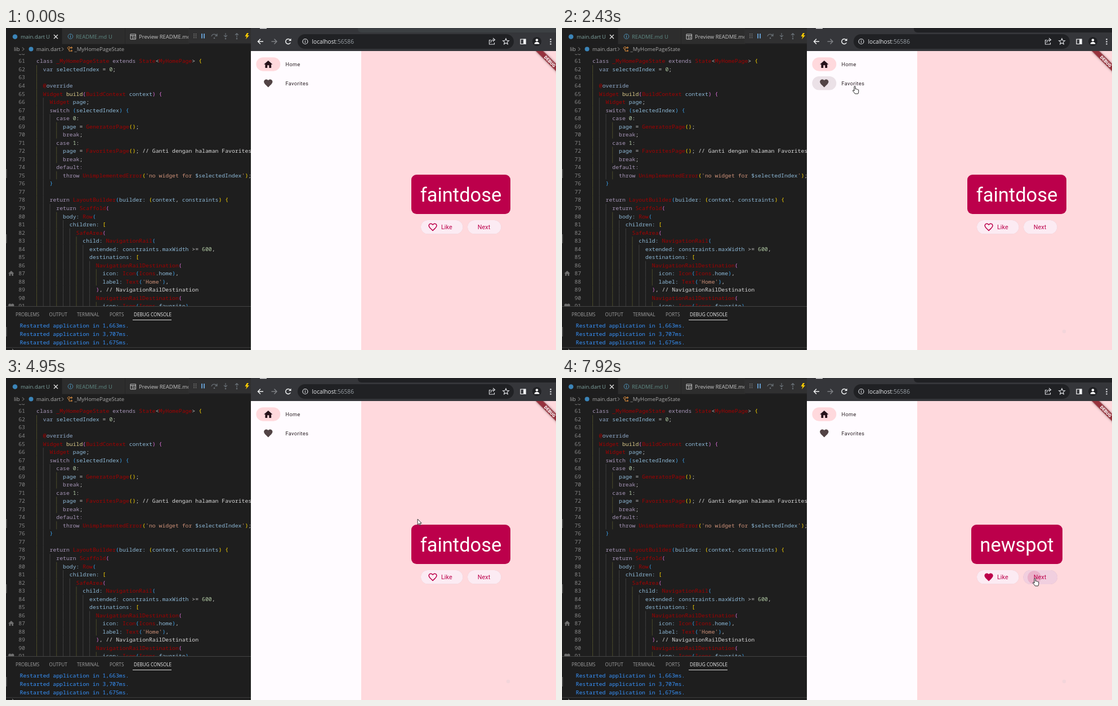
Recreate the animation shown at these times as an HTML page. Size 977 by 573 pixels, loop 7990 ms.

```html
<!DOCTYPE html>
<html lang="en">
<head>
<meta charset="utf-8">
<title>Word pair app</title>
<style>
  html, body { margin: 0; width: 100%; height: 100%; overflow: hidden; background: #1e1e1e; }
  svg { display: block; }
  text { white-space: pre; }
  .code { font: 9.8px "Noto Sans Mono", "DejaVu Sans Mono", monospace; }
  .ui { font: 9.5px "Open Sans", "Noto Sans", sans-serif; fill: #c4c4c4; }
  .panel { font-size: 8.2px; fill: #a0a0a0; }
  .crumb { fill: #a9a9a9; }
  .inactive { fill: #5f8a84; }
  .url { font: 10.2px "Open Sans", "Noto Sans", sans-serif; fill: #e8eaed; }
  .app { font-family: Roboto, sans-serif; }
  .label { font-size: 9.19px; letter-spacing: .38px; fill: #2a2024; }
  .body { font-size: 10.72px; letter-spacing: .08px; fill: #bc004b; }
  .line { fill: none; stroke: #dadce0; stroke-width: 1.2; }
  .bright { stroke: #f1f3f4; stroke-width: 1.5; }
  .btn { filter: drop-shadow(0 .8px .6px rgba(80, 10, 40, .2)); }
  .banner { filter: drop-shadow(0 0 2px rgba(0, 0, 0, .4)); }
</style>
</head>
<body>
<svg id="stage" width="977" height="573" viewBox="0 0 977 573">
  <defs>
    <path id="home" d="M10 20v-6h4v6h5v-8h3L12 3 2 12h3v8z"/>
    <path id="heart" d="M12 21.35l-1.45-1.32C5.4 15.36 2 12.28 2 8.5 2 5.42 4.42 3 7.5 3c1.74 0 3.41.81 4.5 2.09C13.09 3.81 14.76 3 16.5 3 19.58 3 22 5.42 22 8.5c0 3.78-3.4 6.86-8.55 11.54z"/>
    <path id="hollow" fill-rule="evenodd" d="M16.5 3c-1.74 0-3.41.81-4.5 2.09C10.91 3.81 9.24 3 7.5 3 4.42 3 2 5.42 2 8.5c0 3.78 3.4 6.86 8.55 11.54L12 21.35l1.45-1.32C18.6 15.36 22 12.28 22 8.5 22 5.42 19.58 3 16.5 3zm-4.4 15.55l-.1.1-.1-.1C7.14 14.24 4 11.39 4 8.5 4 6.5 5.5 5 7.5 5c1.54 0 3.04.99 3.57 2.36h1.87C13.46 5.99 14.96 5 16.5 5c2 0 3.5 1.5 3.5 3.5 0 2.89-3.14 5.74-7.9 10.05z"/>
    <clipPath id="editorClip"><rect y="46" width="435" height="449"/></clipPath>
    <clipPath id="likeClip"><rect x="737" y="342" width="74.5" height="24.5" rx="12.25"/></clipPath>
    <clipPath id="nextClip"><rect x="820" y="342" width="59.5" height="24.5" rx="12.25"/></clipPath>
  </defs>

  <!-- Editor -->
  <rect width="435" height="573" fill="#1e1e1e"/>
  <g id="code" class="code" clip-path="url(#editorClip)"></g>
  <g fill="#6f6f6f" clip-path="url(#editorClip)">
    <use href="#home" transform="translate(3 430.5) scale(.52)"/>
    <use href="#heart" transform="translate(3 489) scale(.52)"/>
    <path d="M0 251h1.5v16H0zM0 367h1.5v16H0z" fill="#555"/>
  </g>
  <path d="M0 532h1.5v17H0z" fill="#555"/>

  <rect width="435" height="28.5" fill="#252526"/>
  <rect width="99" height="28.5" fill="#1e1e1e"/>
  <path d="M100 0h111v28.5H100zM212 0h114v28.5H212z" fill="#2d2d2d"/>
  <g class="ui">
    <circle cx="16" cy="15.5" r="4.3" fill="#3b84b8"/>
    <text x="26" y="19" fill="#7fa3a0">main.dart</text>
    <text x="71" y="19" fill="#7fa3a0">U</text>
    <path d="M85 12l7 7m0-7l-7 7" stroke="#e8e8e8" stroke-width="1.2"/>
    <g fill="none" stroke="#4d8fb3">
      <circle cx="114.5" cy="15" r="4.3"/>
      <path d="M114.5 14v3.5M114.5 12v1.2" stroke-width="1.2"/>
    </g>
    <text class="inactive" x="124" y="19">README.md</text>
    <text class="inactive" x="182" y="19">U</text>
    <path d="M221 11h9.5v9H221zM221 13.5h9.5M225 13.5V20M227 16h2M227 18h2" fill="none" stroke="#c5c5c5"/>
    <text x="236" y="19">Preview README.md</text>
    <rect x="325" width="110" height="28.5" fill="#252526"/>
    <rect x="324" y="2" width="111" height="25" fill="#303031"/>
    <path d="M334 10v8M337.5 10v8" stroke="#888" stroke-width="1.5" stroke-dasharray="1.5 1.7"/>
    <path d="M348 10v8.5M352 10v8.5" stroke="#75beff" stroke-width="1.5"/>
    <g fill="none" stroke="#666d73" stroke-width="1.2">
      <path d="M365 15c1-5 8-5 9.5-1M375 10v4.2h-4"/>
      <path d="M390 9v6.5M387 13l3 3 3-3M410 17v-7M407 12.5l3-3 3 3"/>
    </g>
    <g fill="#666d73"><circle cx="370" cy="18" r="1.3"/><circle cx="390" cy="19" r="1.3"/><circle cx="410" cy="19" r="1.3"/></g>
    <path d="M428 9l-3.5 6h3l-1.5 5 6-7h-3.3l2.3-4z" fill="#ffcc00"/>

    <text class="crumb" x="14" y="41">lib</text>
    <path d="M29 34.5l3 3-3 3M99 34.5l3 3-3 3" fill="none" stroke="#a0a0a0"/>
    <circle cx="44.5" cy="37.5" r="4" fill="#3b84b8"/>
    <text class="crumb" x="54" y="41">main.dart</text>
    <path d="M109 35.5l3-2.5 2 2.5-3 2.5zM113 35h3M112 37v4h3M116 33.5l2 1.5-2 1.5zM116 39l2 1.5-2 1.5z" fill="none" stroke="#e09040"/>
    <text class="crumb" x="121.5" y="41">_MyHomePageState</text>
  </g>

  <path d="M0 495.5h435" stroke="#444"/>
  <g class="ui">
    <text class="panel" x="17" y="512.5">PROBLEMS</text>
    <text class="panel" x="76.5" y="512.5">OUTPUT</text>
    <text class="panel" x="126" y="512.5">TERMINAL</text>
    <text class="panel" x="184" y="512.5">PORTS</text>
    <text class="panel" x="227" y="512.5" style="fill:#eee">DEBUG CONSOLE</text>
  </g>
  <path d="M225 519.5h69" stroke="#ddd"/>
  <g class="code" fill="#3794ff">
    <text x="24.5" y="532.5">Restarted application in 1,663ms.</text>
    <text x="24.5" y="547.8">Restarted application in 3,707ms.</text>
    <text x="24.5" y="563.3">Restarted application in 1,675ms.</text>
  </g>
  <path d="M0 568.5h435" stroke="#3c3c3c"/>
  <path d="M11 571l3 3" stroke="#aaa"/>

  <!-- Browser -->
  <rect x="435" width="542" height="41" fill="#35363a"/>
  <path id="frame" d="M625 0h352v8H632q-7 0-7-7z"/>
  <path d="M451 .5h12" stroke="#f0f0f0" stroke-width="1.5"/>
  <rect x="518" y="11" width="384" height="26" rx="13" fill="#202124"/>
  <g class="line">
    <path class="bright" d="M457 24h-9.5M452 19.5L447.5 24l4.5 4.5"/>
    <path d="M471.500 24h9.5M476.5 19.5L481 24l-4.5 4.5" stroke="#7d8084" stroke-width="1.5"/>
    <path class="bright" d="M505.300 26a4.500 4.500 0 1 1-.8-5.200l1.300 1.400"/>
    <path d="M506.5 18.5v4.5H502z" fill="#f1f3f4" stroke="none"/>
    <circle cx="531.5" cy="24" r="4.5"/>
    <path d="M531.5 23.3v3.2M531.5 21.2v1.2"/>
    <path d="M861.5 21.5H858.5v7.5h9v-3M861 26c.5-4 3-5 6-5M865 18l3.5 3-3.5 3"/>
    <path d="M888 18.8l1.5 3.5 3.8.3-2.9 2.5.9 3.7-3.3-2-3.3 2 .9-3.7-2.9-2.5 3.8-.3z"/>
    <path d="M914 20h9v8.5h-9z" stroke="#fff"/>
    <path d="M919.5 20h3.5v8.5h-3.5z" fill="#fff"/>
  </g>
  <circle cx="943" cy="24" r="8" fill="#202124"/>
  <circle cx="943" cy="21.5" r="2.3" fill="#fff"/>
  <path d="M938.5 28.5c0-5 9-5 9 0z" fill="#fff"/>
  <path d="M967.5 19v10.5" stroke="#e8eaed" stroke-width="2.2" stroke-dasharray="2.2 2"/>
  <text class="url" x="543.5" y="27.5">localhost<tspan fill="#9aa0a6">:56586</tspan></text>

  <!-- App -->
  <rect x="435" y="41" width="196" height="532" fill="#fffbff"/>
  <rect x="631" y="41" width="346" height="532" fill="#ffd9dd"/>
  <circle id="speck" cx="892" cy="540" r="3.2" fill="#f3d5da"/>
  <svg x="631" y="41" width="346" height="80" viewBox="631 41 346 80">
    <g transform="translate(984.5 41) rotate(45)">
      <rect class="banner" x="-31" y="21.4" width="62" height="9.2" fill="#96323d"/>
      <text class="app" y="28.8" font-size="7.8" font-weight="900" fill="#fff" text-anchor="middle">DEBUG</text>
    </g>
  </svg>

  <g class="app">
    <rect id="homePill" x="444.4" y="52.2" width="42.9" height="24.5" rx="12.25"/>
    <rect id="favPill" x="444.4" y="86" width="42.9" height="24.5" rx="12.25"/>
    <use id="homeIcon" href="#home" transform="translate(456.6 55.6) scale(.766)"/>
    <use id="favIcon" href="#heart" transform="translate(456.6 89.1) scale(.766)"/>
    <text class="label" x="496.5" y="68">Home</text>
    <text class="label" x="496.5" y="101.7">Favorites</text>

    <text id="empty" x="807.9" y="315.8" text-anchor="middle" font-size="10.72" letter-spacing=".19" fill="#22191b">No favorites yet.</text>

    <g id="generator">
      <rect id="card" class="btn" y="261" height="70" rx="9.2" fill="#bc004b"/>
      <text id="word" x="808" y="308.8" text-anchor="middle" font-size="34.47" fill="#fff"></text>
      <g id="like">
        <rect class="btn" x="737" y="342" width="74.5" height="24.5" rx="12.25" fill="#fcebf3"/>
        <rect class="hover btn" x="736.5" y="342" width="75.5" height="25" rx="12.5" fill="#f1cfdf"/>
        <g clip-path="url(#likeClip)"><circle class="ripple" fill="#bc004b"/></g>
        <use id="likeIcon" transform="translate(748.9 345.1) scale(.766)" fill="#bc004b"/>
        <text class="body" x="773" y="358">Like</text>
      </g>
      <g id="next">
        <rect class="btn" x="820" y="342" width="59.5" height="24.5" rx="12.25" fill="#fcebf3"/>
        <rect class="hover btn" x="819.5" y="342" width="60.5" height="25" rx="12.5" fill="#f1cfdf"/>
        <g clip-path="url(#nextClip)"><circle class="ripple" fill="#bc004b"/></g>
        <text class="body" x="837.8" y="358">Next</text>
      </g>
    </g>
  </g>

  <circle id="flash" r="11" fill="#f7cf3c" opacity=".8"/>
  <g id="pointer" stroke="#222" fill="#fff" stroke-linejoin="round">
    <path id="arrow" stroke-width=".9" d="M.5.5v10l2.3-2.1 1.6 3.4 1.5-.7-1.5-3.3h3.1z"/>
    <path id="hand" d="M3 8V1.7q0-1.2 1.1-1.2T5.2 1.7v3.8q1.7-.7 2 .5 1.6-.6 1.9.6 1.7-.3 1.7 1.2v2.7q0 1.5-1 3.5H4.5Q3 12 .7 9q-.5-1.3.7-1.5T3 9z"/>
  </g>
</svg>

<script>
const LOOP = 7990;
const $ = s => document.querySelector(s);
const set = (el, attrs) => { for (const k in attrs) el.setAttribute(k, attrs[k]); };
const show = (el, on) => { el.style.display = on ? '' : 'none'; };
const svgEl = (tag, attrs, parent) => {
  const el = document.createElementNS('http://www.w3.org/2000/svg', tag);
  set(el, attrs);
  return parent.appendChild(el);
};

// Editor text, first line is number 60
const source = `
class _MyHomePageState extends State<MyHomePage> {
  var selectedIndex = 0;

  @override
  Widget build(BuildContext context) {
    Widget page;
    switch (selectedIndex) {
      case 0:
        page = GeneratorPage();
        break;
      case 1:
        page = FavoritesPage(); // Ganti dengan halaman Favorites
        break;
      default:
        throw UnimplementedError('no widget for $selectedIndex');
    }

    return LayoutBuilder(builder: (context, constraints) {
      return Scaffold(
        body: Row(
          children: [
            SafeArea(
              child: NavigationRail(
                extended: constraints.maxWidth >= 600,
                destinations: [
                  NavigationRailDestination(
                    icon: Icon(Icons.home),
                    label: Text('Home'),
                  ), // NavigationRailDestination
                  NavigationRailDestination(
                    icon: Icon(Icons.favorite),`;

const brackets = ['#ffd700', '#da70d6', '#3a9fe8'];
const rules = [
  [/^\/\/.*/, '#d8d8d8'],
  [/^'|^no widget for |^Home(?=')/, '#ce9178'],
  [/^@|^_?[A-Z]\w*/, '#a30000'],
  [/^(class|extends|switch|case|default|return|throw|break)\b:?/, '#a796b8'],
  [/^(var|override)\b/, '#8fa9c9'],
  [/^build\b/, '#dcc98a'],
  [/^\d+/, '#b5cea8'],
  [/^\$?[a-z]\w*:?/, '#8db8d6'],
  [/^\s+|^./, '#c8c8c8']
];

function drawCode() {
  const root = $('#code'), step = 5.88, pitch = 14.53;
  let depth = 0, indent = 0;
  source.split('\n').forEach((line, i) => {
    const y = 47.9 + i * pitch;
    const pad = line.search(/\S/);
    if (pad >= 0) indent = pad;
    for (let k = 0; k < indent / 2; k++) {
      svgEl('path', { d: `M${54.5 + k * 2 * step} ${y - 11}v${pitch}`, stroke: k % 3 ? '#3f3f3f' : '#4b4b2a' }, root);
    }
    svgEl('text', { x: 34, y, 'text-anchor': 'end', fill: '#858585' }, root).textContent = 60 + i;
    if (pad < 0) return;
    const text = svgEl('text', { x: 54 + pad * step, y }, root);
    let rest = line.slice(pad);
    while (rest) {
      const [re, base] = rules.find(r => r[0].test(rest));
      const token = rest.match(re)[0];
      let fill = base;
      if (/^[([{]$/.test(token)) fill = brackets[depth++ % 3];
      else if (/^[)\]}]$/.test(token)) fill = brackets[--depth % 3];
      svgEl('tspan', { fill }, text).textContent = token;
      rest = rest.slice(token.length);
    }
  });
}

// Pointer path: time, x, y
const path = [
  [790, 911, 559], [860, 892, 540], [1000, 800, 410], [1140, 706, 279], [1290, 706, 279],
  [1750, 537, 133], [1930, 474, 97], [2090, 516, 102], [2160, 516, 103], [2960, 516, 103],
  [3250, 505, 84], [3430, 466, 61], [3590, 499, 64], [4400, 499, 64],
  [5230, 848, 345], [5300, 844, 347], [5490, 833, 350], [6370, 833, 350],
  [6770, 775, 349], [7180, 775, 349], [7510, 836, 356], [LOOP, 836, 356]
];

function pointerAt(t) {
  const i = path.findIndex(k => k[0] > t);
  const [t0, x0, y0] = path[i - 1], [t1, x1, y1] = path[i];
  const p = (t - t0) / (t1 - t0);
  return [x0 + (x1 - x0) * p, y0 + (y1 - y0) * p];
}

const press = { fav: 2310, home: 3850, next: 5630, like: 6840, again: 7850 };
const within = (t, from, length) => t >= from && t < from + length;

function drawRail(t) {
  const favPicked = within(t, press.fav + 140, press.home - press.fav);
  const favLit = within(t, press.fav + 250, press.home + 30 - press.fav);
  const pink = '#ffd9dd', grey = '#ebe1e7';
  const homeInk = within(t, press.home, 280), favInk = within(t, press.fav, 250);
  set($('#homePill'), { fill: homeInk ? grey : favLit ? 'none' : pink });
  set($('#favPill'), { fill: favInk ? grey : favLit ? pink : 'none' });
  set($('#homeIcon'), { fill: favPicked ? '#524345' : '#26121a' });
  set($('#favIcon'), { fill: favPicked ? '#26121a' : '#524345' });
  show($('#empty'), favPicked);
  show($('#generator'), !favPicked);
}

function drawRipple(id, t, start, cx, cy) {
  const age = Math.floor((t - start) / 70) * 70;
  const on = age >= 70 && age < 490;
  const r = age < 140 ? 12 : age < 210 ? 38 : 75;
  const opacity = .14 * Math.min(1, (490 - age) / 280);
  const el = $(`#${id} .ripple`);
  show(el, on);
  if (on) set(el, { cx, cy, r, opacity });
}

function draw(t) {
  drawRail(t);
  // The window frame darkens once the first click focuses it
  set($('#frame'), { fill: t < press.fav ? '#3c4043' : '#202124' });

  const swapped = t >= press.next + 140;
  const width = swapped ? 162 : 176;
  $('#word').textContent = swapped ? 'newspot' : 'faintdose';
  set($('#card'), { x: 808 - width / 2, width });
  set($('#likeIcon'), { href: t >= press.like + 140 ? '#heart' : '#hollow' });

  const visible = t >= 790;
  const [x, y] = visible ? pointerAt(t) : [0, 0];
  const onButtons = t >= 5230 && y > 338;
  const onLike = onButtons && x < 808;
  const onNext = onButtons && x > 816 && t >= 5300;
  const onRail = x < 631 && y < 115;
  show($('#like .hover'), onLike);
  show($('#next .hover'), onNext);
  drawRipple('like', t, press.like, 778, 353);
  if (t < press.again) drawRipple('next', t, press.next, 836, 354);
  else drawRipple('next', t, press.again, 839, 355);

  const hand = onRail || onLike || onNext || within(t, 5190, 110);
  show($('#pointer'), visible);
  show($('#hand'), hand);
  show($('#arrow'), !hand);
  set($('#pointer'), { transform: `translate(${x} ${y})` });
  show($('#speck'), t >= 860);

  show($('#flash'), Object.values(press).some(p => within(t, p, 70)));
  set($('#flash'), { cx: x + 3, cy: y + 4 });
}

drawCode();
const begin = performance.now();
function tick() {
  draw((performance.now() - begin) % LOOP);
  requestAnimationFrame(tick);
}
tick();
</script>
</body>
</html>
```
